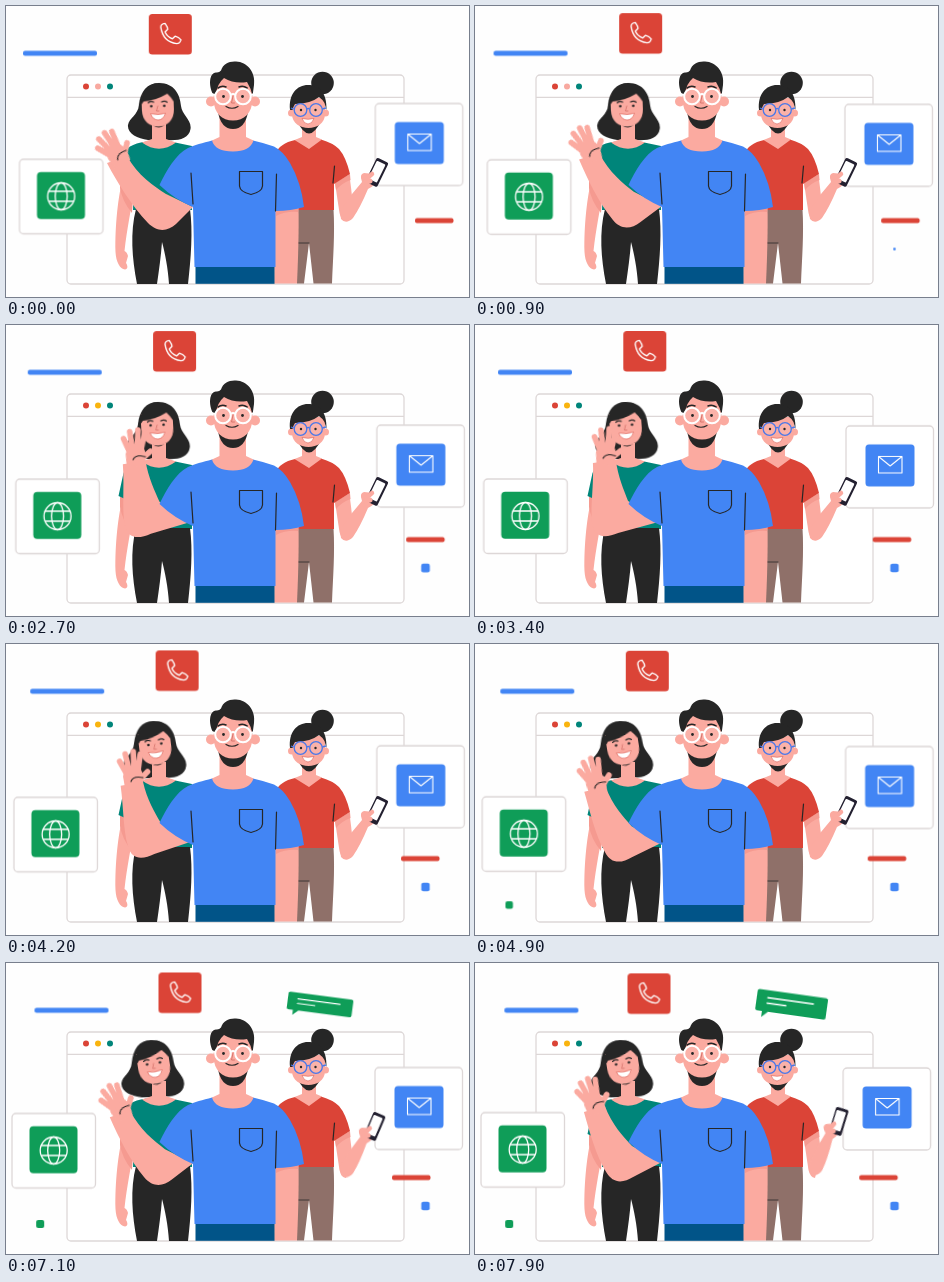
An HTML page without scripts that plays this animation: 463 px wide and 291 px high, repeating every 8000 ms.

```html
<!DOCTYPE html>
<html lang="en">
<head>
<meta charset="utf-8">
<title>Team wave</title>
<style>
html, body { margin: 0; width: 100%; height: 100%; overflow: hidden; background: #fefefe; }
svg { display: block; width: 463px; height: 291px; }
.move { animation: 8s linear infinite; }
.skin { fill: #fbaaa0; }
.shade { fill: #f59a90; }
.ink { fill: #262626; }
.blue { fill: #4285f4; }
.red { fill: #db4437; }
.green { fill: #0f9d58; }
.teal { fill: #00857a; }
.card { fill: #fff; stroke: #ddd7d7; stroke-width: 1.3; }
.icon { fill: none; stroke: #fff; stroke-width: 1.3; stroke-linejoin: round; }
.line { fill: none; stroke: #262626; stroke-width: 1.2; stroke-linecap: round; stroke-linejoin: round; }
.finger { fill: none; stroke: #fbaaa0; stroke-width: 5.6; stroke-linecap: round; }

/* slow drifts */
#bar { animation-name: bar; }
@keyframes bar {
  0% { transform: translate(17px, 47.3px); }
  23.75% { transform: translate(20.3px, 47.3px); }
  42.5% { transform: translate(23px, 47.3px); }
  61.25% { transform: translate(25.3px, 47.3px); }
  73.75% { transform: translate(26.8px, 47.3px); }
  88.75% { transform: translate(28.5px, 47.3px); }
  100% { transform: translate(29.5px, 47.3px); }
}
#dash { animation-name: dash; }
@keyframes dash {
  0% { transform: translate(409px, 214.6px); }
  23.75% { transform: translate(403px, 214.6px); }
  42.5% { transform: translate(397.7px, 214.6px); }
  61.25% { transform: translate(392.7px, 214.6px); }
  73.75% { transform: translate(389.5px, 214.6px); }
  88.75% { transform: translate(386px, 214.6px); }
  100% { transform: translate(384px, 214.6px); }
}
#call { animation-name: call; }
@keyframes call {
  0% { transform: translate(142.8px, 8px); }
  23.75% { transform: translate(145.7px, 6.2px); }
  42.5% { transform: translate(148.3px, 6px); }
  61.25% { transform: translate(150.8px, 6.8px); }
  73.75% { transform: translate(152px, 7.9px); }
  88.75% { transform: translate(152.5px, 9.5px); }
  100% { transform: translate(152.5px, 10.5px); }
}
#web { animation-name: web; }
@keyframes web {
  0% { transform: translate(13.5px, 153.3px); }
  23.75% { transform: translate(11px, 154.3px); }
  42.5% { transform: translate(8.7px, 154px); }
  61.25% { transform: translate(7.2px, 152.8px); }
  73.75% { transform: translate(6.4px, 151.7px); }
  88.75% { transform: translate(6px, 150.5px); }
  100% { transform: translate(6px, 149.5px); }
}
#mail { animation-name: mail; }
@keyframes mail {
  0% { transform: translate(369.3px, 97.5px); }
  23.75% { transform: translate(370.6px, 99.3px); }
  42.5% { transform: translate(371px, 100.9px); }
  61.25% { transform: translate(370.6px, 102.5px); }
  73.75% { transform: translate(370px, 103.5px); }
  88.75% { transform: translate(369px, 104.5px); }
  100% { transform: translate(368px, 105px); }
}

/* pop-ins */
#dotB { animation-name: popB; }
@keyframes popB {
  0%, 9% { transform: translate(419.5px, 243px) scale(0); }
  16% { transform: translate(419.5px, 243px) scale(.9); }
  22% { transform: translate(419.5px, 243px) scale(1.18); }
  36%, 100% { transform: translate(419.5px, 243px) scale(1); }
}
#dotG { animation-name: popG; }
@keyframes popG {
  0%, 54% { transform: translate(34.2px, 261px) scale(0); }
  61.25% { transform: translate(34.2px, 261px) scale(.93); }
  71% { transform: translate(34.2px, 261px) scale(1.22); }
  84%, 100% { transform: translate(34.2px, 261px) scale(1); }
}
#chat { animation-name: chat; }
@keyframes chat {
  0%, 71% { transform: translate(282px, 51px) rotate(-10deg) scale(0); }
  73.75% { transform: translate(282.5px, 50px) rotate(-8deg) scale(.28, .33); animation-timing-function: ease-out; }
  88.75% { transform: translate(280.5px, 46px) rotate(7.5deg) scale(.92, .83); }
  98.75%, 100% { transform: translate(280px, 47px) rotate(8deg); }
}
#mid { animation-name: mid; animation-timing-function: step-end; }
@keyframes mid { 0% { fill: #f8a9a0; } 12% { fill: #f9b40f; } }

/* waving arm */
#arm { animation-name: arm; animation-timing-function: cubic-bezier(.364, 0, .636, 1); }
@keyframes arm {
  0%, 81.25% { d: path("M101 157C112 178 126 200 142 217C152 227 162 225 170 218L187 201L160 188C148 180 132 170 121 150Z"); }
  40.6% { d: path("M118 138C119 160 115 184 117 198C119 214 131 213 143 208L187 196L153 176C149 165 143 152 141 135Z"); }
  81.25% { animation-timing-function: cubic-bezier(.47, 0, .745, .715); }
  100% { d: path("M109 149C115 170 121 193 131 209C138 221 148 220 158 214L187 199L157 183C148 173 137 162 130 143Z"); }
}
#hand { animation-name: hand; animation-timing-function: cubic-bezier(.364, 0, .636, 1); }
@keyframes hand {
  0%, 81.25% { transform: translate(109px, 145px) rotate(-30deg); }
  40.6% { transform: translate(131.5px, 124.5px) rotate(8deg); }
  81.25% { animation-timing-function: cubic-bezier(.47, 0, .745, .715); }
  100% { transform: translate(118px, 136px) rotate(-14deg); }
}

/* head sway and phone lift */
#hair, #face { transform-origin: 153px 135px; animation-timing-function: ease-in-out; }
#hair { animation-name: hair; }
@keyframes hair {
  0% { transform: none; }
  23.75% { transform: translate(.5px, 0); }
  42.5% { transform: translate(-1.5px, 0) rotate(-1deg); }
  61.25%, 100% { transform: translate(-6px, 0) rotate(-2deg); }
}
#face { animation-name: face; }
@keyframes face {
  0%, 23.75% { transform: rotate(-2deg); }
  42.5% { transform: rotate(-4deg); }
  61.25%, 100% { transform: rotate(-9deg); }
}
#lift { transform-origin: 342px 210px; animation-name: lift; }
@keyframes lift {
  0%, 76% { transform: none; }
  88.75% { transform: translate(0, -1.5px) rotate(-3deg); }
  98.75%, 100% { transform: translate(0, -4px) rotate(-9deg); }
}
</style>
</head>
<body>
<svg viewBox="0 0 463 291">
  <!-- window -->
  <rect class="card" x="61" y="69" width="337" height="209" rx="4"/>
  <path class="card" d="M61 91.3H398"/>
  <circle class="red" cx="80" cy="80.5" r="3"/>
  <circle id="mid" class="move" cx="92" cy="80.5" r="3"/>
  <circle class="teal" cx="104" cy="80.5" r="3"/>

  <!-- floating pieces -->
  <rect id="bar" class="move blue" y="-2.5" width="74" height="5" rx="2"/>
  <rect id="dash" class="move red" y="-2.5" width="38.5" height="5" rx="2"/>
  <rect id="dotB" class="move blue" x="-4.2" y="-4.2" width="8.4" height="8.4" rx="2"/>
  <rect id="dotG" class="move green" x="-4" y="-4" width="8" height="8" rx="2"/>
  <g id="call" class="move">
    <rect class="red" width="43" height="40.5" rx="3.5"/>
    <path class="icon" transform="translate(21.5 19.5) scale(1.06)" d="M-9-6Q-9-9-5-9.5Q-2.5-6-2.5-4L-5-1.5Q-3 3 2 5L4.500 2.500Q8 3.500 10 6Q9 9.500 6 9.500Q-7 8-9-6Z"/>
  </g>
  <g id="chat" class="move">
    <path class="green" d="M2-21.500H69Q71-21.500 71-19.500V-2Q71 0 69 0H13L7 6V0H2Q0 0 0-2V-19.500Q0-21.500 2-21.500Z"/>
    <path class="icon" stroke-linecap="round" d="M11-14H57M11-8.500H30"/>
  </g>
  <g id="web" class="move">
    <rect class="card" width="83.500" height="74.500" rx="4"/>
    <rect class="green" x="17.500" y="12.800" width="48" height="47" rx="4"/>
    <g class="icon" transform="translate(41.700 37)">
      <circle r="13.500"/>
      <ellipse rx="6" ry="13.500"/>
      <path d="M-12.500-5H12.500M-12.500 5H12.500"/>
    </g>
  </g>
  <g id="mail" class="move">
    <rect class="card" width="87.500" height="82" rx="4"/>
    <rect class="blue" x="19.500" y="18.500" width="49" height="42" rx="3.500"/>
    <path class="icon" style="stroke-width:1.1" d="M32.500 30.500H56V47H32.500ZL44.200 40L56 30.500"/>
  </g>

  <!-- left woman -->
  <path id="hair" class="move ink" d="M153 77C168 77 174 88 175 100C176 109 186 114 184.500 123C183 133 172 135 160 134H142C131 133 121 127 122 119C123 112 132 109 133 99C135 85 141 77 153 77Z"/>
  <path class="skin" d="M117 172C112 190 109 220 109.500 246C110 256 114 263 119 263.500C122 263 122 260 120 257L122 250Q121 246 118.500 245C121 222 125 205 128 184Z"/>
  <path class="shade" d="M114 171L128 178L126 207Q116 195 114 182Z"/>
  <path class="teal" d="M144 135C131 137 121 139 117.500 148L112.500 171L128 178L127 204H186V140L162 135Z"/>
  <path class="skin" d="M146 118V133L136 136.500Q153 149 170 136.500L160 133V118Z"/>
  <path class="ink" d="M130 203H184C187 225 185 252 182 278H163C162 262 159 247 156 236C155 250 153 264 151 278H131C126 252 124 226 130 203Z"/>
  <g id="face" class="move">
    <path class="ink" d="M142 112Q153 131 165 112Z"/>
    <path class="skin" d="M137 88H169V104C169 115 161 120.500 153 120.500C145 120.500 137 115 137 104Z"/>
    <path class="ink" d="M134.500 103C134 84 146 77 155 77.500C166 78 173 88 171.500 103L169 96Q166 91 163 88Q150 95 139 95Q136 98 134.500 103Z"/>
    <circle class="ink" cx="146.500" cy="100" r="1.300"/>
    <circle class="ink" cx="159.500" cy="100" r="1.300"/>
    <path class="line" d="M143.500 96.500Q146 94.500 149 96M157 96Q160 94.500 162.500 96.500"/>
    <path d="M153 100L151.500 105H154" class="line" style="stroke:#d9776f;stroke-width:.9"/>
    <path d="M145.500 107.500Q153 109.500 160.500 107.500Q158 114 153 114Q148 114 145.500 107.500Z" fill="#fff" stroke="#db5a50" stroke-width=".6"/>
  </g>

  <!-- right woman -->
  <path d="M291 203H327.500C329 228 327 252 326 277.500H307.500L303 237L298 277.500H291Z" fill="#8f7069"/>
  <path class="line" d="M292 237H303" style="stroke-width:.8"/>
  <path class="skin" d="M329 177L343.500 169L346 190L340 215Q335 214 333.500 207Z"/>
  <g id="lift" class="move">
    <path class="skin" d="M334 206Q340 196 346 188L356 176Q353 168 358 167L368 168L369 178Q366 181 362 183Q354 202 347 212Q340 219 335 213Z"/>
    <g transform="translate(371 166.300) rotate(26)">
      <rect x="-6.500" y="-13.500" width="13" height="27" rx="2" fill="#232030"/>
      <rect x="-5.200" y="-10.500" width="9.600" height="20" rx="1" fill="#fff"/>
    </g>
    <path class="finger" d="M360 173L366 168" style="stroke-width:4.5"/>
    <path class="finger" d="M360 176L364 175" style="stroke-width:5"/>
  </g>
  <path class="shade" d="M329 177L344 168L344.500 174Q336 177 330 184Z"/>
  <path class="red" d="M289 134C279 136 272 141 269 148L270 204H328L328 178L344 168Q340 151 333 143Q327 137 315 133.500Z"/>
  <path class="line" d="M328.500 160L327 177"/>
  <path class="skin" d="M296 117V131L288.500 134L303 143L316 133.500L310 131V117Z"/>
  <circle class="ink" cx="316.500" cy="77" r="11.300"/>
  <path class="ink" d="M291 115Q303 140 315 115Z"/>
  <circle class="skin" cx="285.500" cy="107" r="3.500"/>
  <circle class="skin" cx="319.500" cy="107" r="3.500"/>
  <path class="skin" d="M286 92H319V108C319 117 311 122 302.500 122C294 122 286 117 286 108Z"/>
  <path class="ink" d="M284 104C282.500 88 291 79 302 79C313 79 321 86 320.500 104L318.500 97Q316 93 313 91Q304 98 289 98Q287 101 286.500 104Z"/>
  <g fill="#fff" fill-opacity=".1" stroke="#4b78e8" stroke-width="1.300">
    <circle cx="294.500" cy="104" r="6.300"/>
    <circle cx="310" cy="104" r="6.300"/>
    <path d="M300.800 103Q302 102 303.700 103M288 103L285 102M316.300 103L320 102"/>
  </g>
  <circle class="ink" cx="295" cy="104" r="1.200"/>
  <circle class="ink" cx="309.500" cy="104" r="1.200"/>
  <path d="M296 112.500Q302 114 308 112.500Q306 118 302 118Q298 118 296 112.500Z" fill="#fff" stroke="#db5a50" stroke-width=".6"/>

  <!-- man -->
  <path id="arm" class="move skin"/>
  <g id="hand" class="move">
    <path class="skin" d="M-8.500-2Q0-8 7.500-4L11 4L9 15H-8L-10 4Z"/>
    <path class="finger" d="M-6 2L-13.500-11M-4-3L-8-18.500M1-4L0-21M5-2L7-18.500"/>
    <path class="finger" d="M6 8L14.500-1"/>
    <path class="line" d="M-2 9Q0 3 10 5"/>
  </g>
  <path class="skin" d="M269 198H292.500C293 228 292 255 291 277.500H268Z"/>
  <path class="shade" d="M270 204L292 200V206Q280 205 270 210Z"/>
  <rect x="189.500" y="260" width="79" height="17.800" fill="#015488"/>
  <path class="blue" d="M206 134.500C197 137 188 139 182 142C170 148 160 165 153.500 179Q168 193 187 201L188.500 261H269.500V205Q285 205 298 201Q295 176 284 157Q277 145 268 140.500Q258 137 247 134.500Z"/>
  <path class="line" d="M185 167L187 198M270.500 168L269.500 205M233.500 165.500H256.500V180Q256 186 245 188.500Q234 186 233.500 180Z"/>
  <path class="skin" d="M213.500 108V131L206 134.500Q209 145.500 227 145.500Q244 145.500 247.500 134.500L240 131V108Z"/>
  <path class="ink" d="M212 106Q215 123 227 123Q239 123 242 106Z"/>
  <circle class="skin" cx="205" cy="95.500" r="5"/>
  <circle class="skin" cx="249" cy="95.500" r="5"/>
  <path class="skin" d="M207.500 82L214 70H242L246.500 82V94C246 107 238 114.500 227 114.500C216 114.500 208 107 207.500 94Z"/>
  <path class="ink" d="M207 88C202.500 80 203 67 210 66.500Q213 67 215 64.500C217 58 223 55 230 55.500C241 56 250 66 248 79L246.500 90Q245.500 83 241 76Q228 78 218 72Q211 78 210 88Z"/>
  <path class="line" d="M212 82Q216 79 220 81M233 81Q237 79 241 82" style="stroke-width:1.6"/>
  <g fill="#fff" fill-opacity=".1" stroke="#fff" stroke-width="2">
    <circle cx="217" cy="90.500" r="7.800"/>
    <circle cx="237" cy="90.500" r="7.800"/>
    <path d="M224.800 89Q227 87 229.200 89M209 89L205 88M245 89L249 88"/>
  </g>
  <circle class="ink" cx="217.500" cy="90.500" r="1.400"/>
  <circle class="ink" cx="236.500" cy="90.500" r="1.400"/>
  <path class="line" d="M227 90L225.500 97H228.500" style="stroke:#d9776f;stroke-width:1"/>
  <path class="line" d="M220 100.500Q226 104 232 100.500"/>
</svg>
</body>
</html>
```
